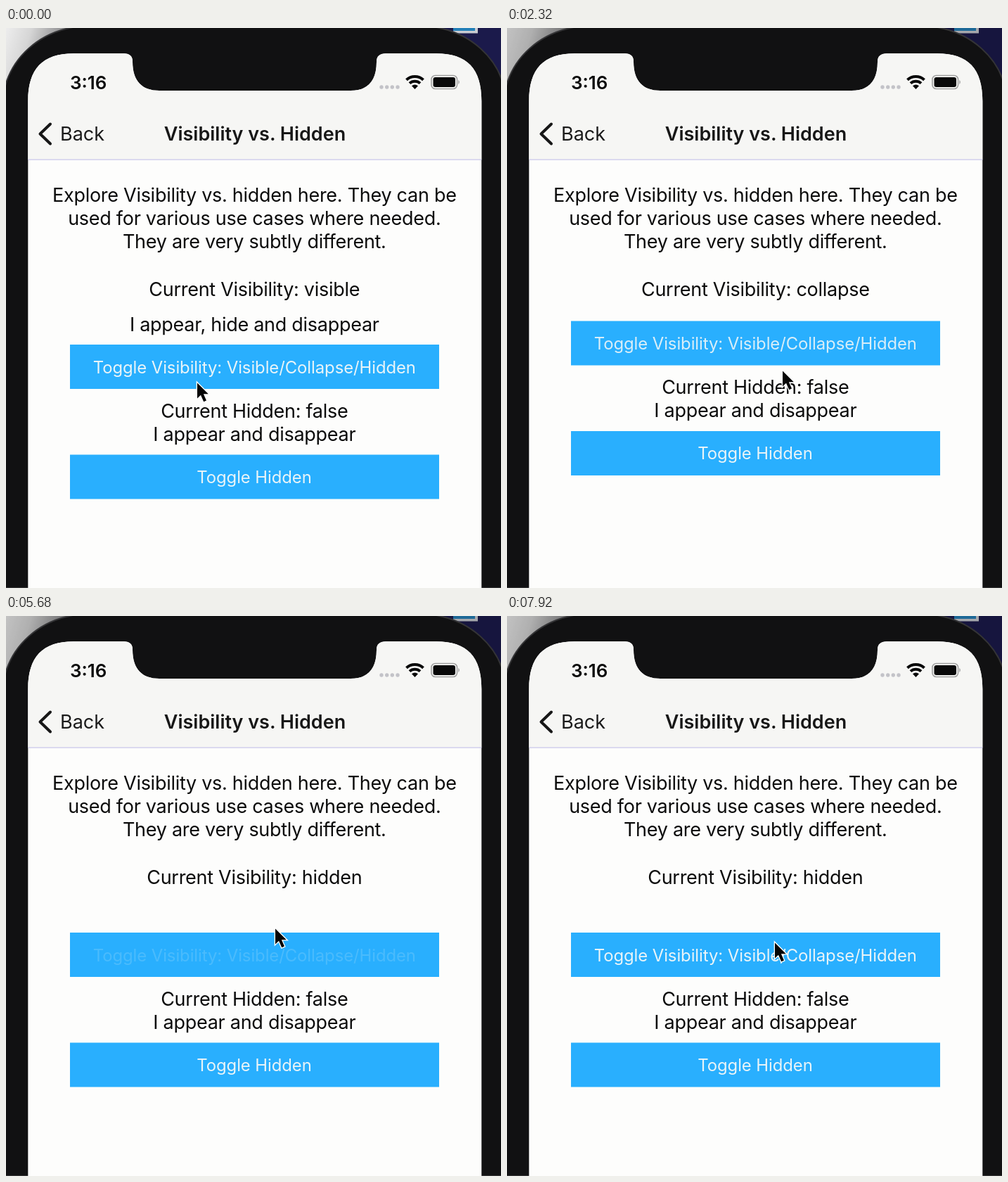
An HTML page that plays this animation: 704x796 px, repeating every 8 s.

```html
<!DOCTYPE html>
<html lang="en">
<head>
<meta charset="utf-8">
<title>Visibility vs. Hidden</title>
<style>
  html, body { margin: 0; width: 100%; height: 100%; overflow: hidden; background: #111112; }
  svg { display: block; width: 704px; height: 796px; }
  text { font: 27px Inter, sans-serif; letter-spacing: -.28px; fill: #0b0b0b; }
  .center text { text-anchor: middle; }
  text.title { font-weight: 600; letter-spacing: 0; fill: #171717; }
  text.time { font-size: 26px; font-weight: 600; letter-spacing: 0; }
  text.label { font-size: 23.9px; letter-spacing: -.08px; fill: #e9f4f8; }
  .button { fill: #29affe; }
</style>
</head>
<body>
<svg viewBox="0 0 704 796">
  <defs>
    <linearGradient id="wall" gradientUnits="userSpaceOnUse" x1="0" y1="0" x2="95" y2="30">
      <stop offset="0" stop-color="#ededed"/>
      <stop offset=".35" stop-color="#d6d6d6"/>
      <stop offset="1" stop-color="#6c6c6e"/>
    </linearGradient>
  </defs>

  <!-- Desktop behind the phone -->
  <rect width="352" height="100" fill="url(#wall)"/>
  <rect x="352" width="352" height="100" fill="#1b1a4b"/>
  <path d="M636 0H671V7.500H636Z" fill="#c9ccd2"/>
  <path d="M636 0H667V4H636Z" fill="#2480b8"/>
  <rect id="dim" width="704" height="100" fill="#000" opacity="0"/>

  <!-- Phone body and screen -->
  <path d="M-1 796V82C10 42 45 8 95 -1H612C662 8 697 42 708 82V796Z" fill="#111112" stroke="#343436" stroke-width="2"/>
  <clipPath id="screen">
    <path d="M31.300 796V104C31.300 58 52 36.300 96 36.300H168Q180 36.300 180 48C180 76 194 89 218 89H490C514 89 527 76 527 48Q527 36.300 540 36.300H612C656 36.300 676.300 58 676.300 104V796Z"/>
  </clipPath>
  <g clip-path="url(#screen)">
    <rect width="704" height="796" fill="#fdfdfc"/>
    <rect width="704" height="187" fill="#f6f6f4"/>
    <rect y="186.500" width="704" height="1.200" fill="#c9c6ec"/>
  </g>

  <!-- Status bar -->
  <text class="time" x="91" y="87">3:16</text>
  <g fill="#c3c3c8">
    <circle cx="534" cy="84" r="2.700"/><circle cx="541.700" cy="84" r="2.700"/>
    <circle cx="549.300" cy="84" r="2.700"/><circle cx="557" cy="84" r="2.700"/>
  </g>
  <g fill="none" stroke="#080808" stroke-width="4">
    <path d="M569.500 73.800A17.500 17.500 0 0 1 593.500 73.800"/>
    <path d="M574 78.600A11 11 0 0 1 589 78.600"/>
  </g>
  <path d="M581.500 87L577 82.300Q581.500 78.800 586 82.300Z" fill="#080808"/>
  <rect x="605" y="67.500" width="36.500" height="19" rx="5.500" fill="none" stroke="#a0a0a0" stroke-width="1.600"/>
  <rect x="607.500" y="70" width="31.500" height="14" rx="3.200" fill="#080808"/>
  <path d="M643.300 73.800Q646.500 77 643.300 80.200Z" fill="#a0a0a0"/>

  <!-- Navigation bar -->
  <path d="M63 136.500L48.500 150.500L63 164.500" fill="none" stroke="#171717" stroke-width="4" stroke-linecap="round" stroke-linejoin="round"/>
  <text x="77" y="160" style="letter-spacing:0;fill:#1b1b1b">Back</text>

  <g class="center">
    <text class="title" x="354" y="160">Visibility vs. Hidden</text>
    <text x="353.300" y="246.500">Explore Visibility vs. hidden here. They can be</text>
    <text x="353.300" y="280">used for various use cases where needed.</text>
    <text x="353.300" y="313">They are very subtly different.</text>
    <text id="status" x="353.300" y="380.500"></text>
    <text id="message" x="353.300" y="430.500">I appear, hide and disappear</text>
    <g id="lower">
      <rect class="button" x="91" y="450" width="525" height="63"/>
      <text id="toggleLabel" class="label" x="353.300" y="490.500">Toggle Visibility: Visible/Collapse/Hidden</text>
      <text x="353.300" y="553.500">Current Hidden: false</text>
      <text x="353.300" y="586.700">I appear and disappear</text>
      <rect class="button" x="91" y="606.500" width="525" height="63"/>
      <text class="label" x="353" y="646.700">Toggle Hidden</text>
    </g>
  </g>

  <path id="cursor" d="M2 3.500V25.500L7 20.800L11.200 30.300L15 28.600L10.900 19.300H17.800Z" fill="#050505" stroke="#fff" stroke-width="2.600" paint-order="stroke"/>
</svg>
<script>
const LOOP = 8000, FADE = 820;
const COLLAPSE_AT = 1580, HIDE_AT = 5640;
const $ = id => document.getElementById(id);

// Cursor tip positions: [time, x, y]
const path = [
  [40, 270, 501], [760, 390, 484],
  [2600, 390, 484], [3280, 381, 441],
  [6800, 381, 441], [7460, 379, 461]
];

const clamp = v => Math.min(1, Math.max(0, v));
const smooth = p => p * p * (3 - 2 * p);

function cursorAt(t) {
  let [, x, y] = path[0];
  for (let i = 1; i < path.length; i++) {
    const [t0, x0, y0] = path[i - 1], [t1, x1, y1] = path[i];
    if (t < t0) break;
    const p = smooth(clamp((t - t0) / (t1 - t0)));
    x = x0 + (x1 - x0) * p;
    y = y0 + (y1 - y0) * p;
  }
  return [x, y];
}

function render(t) {
  const state = t < COLLAPSE_AT ? 'visible' : t < HIDE_AT ? 'collapse' : 'hidden';
  const clickedAt = { visible: -LOOP, collapse: COLLAPSE_AT, hidden: HIDE_AT }[state];

  $('status').textContent = 'Current Visibility: ' + state;
  $('message').style.visibility = state === 'visible' ? 'visible' : 'hidden';
  $('lower').setAttribute('transform', `translate(0 ${state === 'collapse' ? -33.5 : 0})`);
  $('toggleLabel').style.opacity = .13 + .87 * clamp((t - clickedAt) / FADE);
  $('dim').style.opacity = state === 'visible' ? 0 : .18;
  $('cursor').setAttribute('transform', `translate(${cursorAt(t)})`);
}

const start = performance.now();
function tick() {
  render((performance.now() - start) % LOOP);
  requestAnimationFrame(tick);
}
tick();
</script>
</body>
</html>
```
